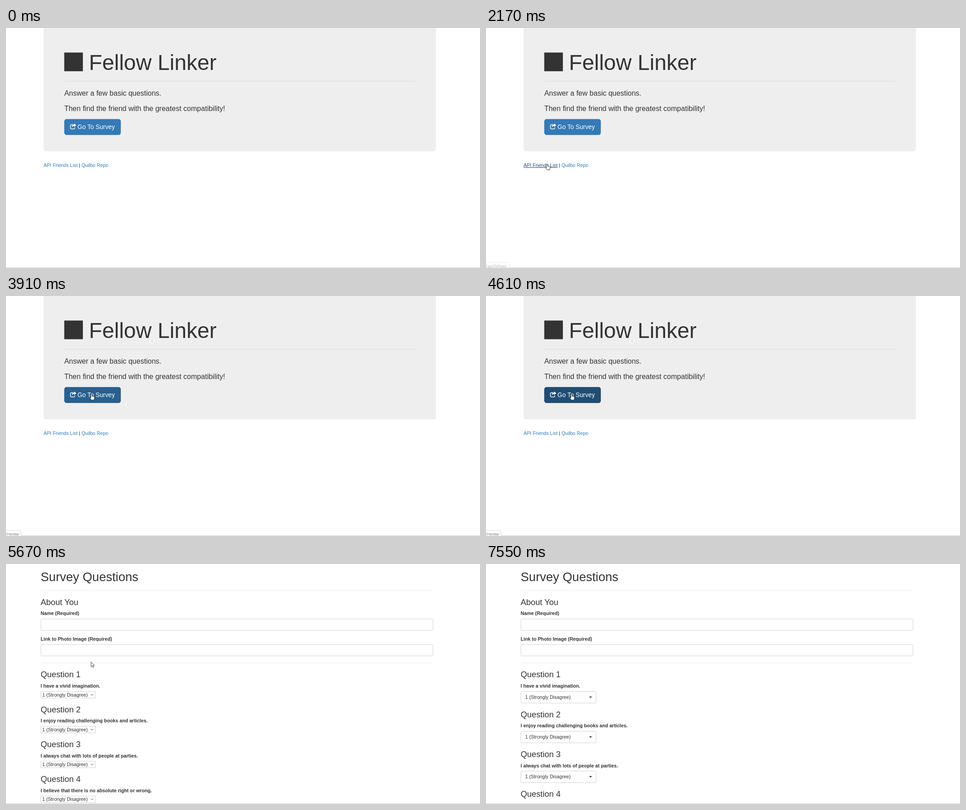
Recreate the animation shown at these times as an HTML page. Size 1053 by 532 pixels, loop 7.96 s.

```html
<!DOCTYPE html>
<html lang="en">
<head>
<meta charset="utf-8">
<title>Survey walkthrough</title>
<style>
html, body { margin: 0; width: 100%; height: 100%; overflow: hidden; background: #fff; }
svg { display: block; width: 1053px; height: 532px; font: 10.7px "Liberation Sans", Arial, sans-serif; fill: #333; }
.lead { font-size: 16.05px; }
.link { fill: #337ab7; }
.link.on { fill: #23527c; text-decoration: underline; }
.btn { fill: #337ab7; stroke: #2e6da4; stroke-width: .8; }
.btn.on { fill: #286090; stroke: #204d74; }
.btn.down { fill: #204d74; stroke: #122b40; }
.h1 { font-size: 27.5px; }
.h3 { font-size: 18.35px; }
.b { font-weight: bold; }
.rule { fill: #eee; }
.field { fill: #fff; stroke: #ccc; stroke-width: .9; }
.status { font: 8.5px "Open Sans", "Noto Sans", sans-serif; fill: #777; }
.status path { fill: #fff; stroke: #d8d8d8; }
.cursor { fill: #fff; stroke: #222; stroke-width: .85; stroke-linejoin: round; }
</style>
</head>
<body>
<svg viewBox="0 0 1053 532">
  <g id="home">
    <rect x="83.7" y="-10" width="871.5" height="283.2" rx="4.6" fill="#eee"/>
    <rect x="129.4" y="54.4" width="41.4" height="41.4"/>
    <text x="184.3" y="92.6" font-size="48.15">Fellow Linker</text>
    <rect x="129.6" y="117.5" width="780" height="1" fill="#d5d5d5"/>
    <text class="lead" x="129.4" y="150">Answer a few basic questions.</text>
    <text class="lead" x="129.4" y="184.4">Then find the friend with the greatest compatibility!</text>
    <rect id="btn" x="129.9" y="202.3" width="124.7" height="34.4" rx="4.4"/>
    <path d="M149 214.2h-3.6q-2.2 0-2.2 2.2v5.2q0 2.2 2.2 2.2h5.2q2.2 0 2.2-2.2v-1.4" fill="none" stroke="#fff" stroke-width="1.4"/>
    <path d="M151.3 211.6l4.7 4-4.7 4v-2.3q-3.3-.2-5 3.1 0-6 5-6.4z" fill="#fff"/>
    <text x="158.8" y="224" font-size="13.76" fill="#fff">Go To Survey</text>
    <text x="83.5" y="307.8"><tspan id="link">API Friends List</tspan> | <tspan class="link">Quilbo Repo</tspan></text>
  </g>
  <g id="form">
    <text class="h1" x="77" y="37.5">Survey Questions</text>
    <rect class="rule" x="77" y="58" width="872" height="1"/>
    <text class="h3" x="77" y="90.6">About You</text>
    <text class="b" x="77" y="113.2">Name (Required)</text>
    <rect class="field" x="77.4" y="121.9" width="871" height="25.4" rx="3"/>
    <text class="b" x="77" y="169.7">Link to Photo Image (Required)</text>
    <rect class="field" x="77.4" y="178.4" width="871" height="25.4" rx="3"/>
    <rect class="rule" x="77" y="219" width="872" height="1"/>
    <g id="plain"></g>
    <g id="styled"></g>
  </g>
  <rect y="531" width="1053" height="1" fill="#ccc"/>
  <g id="status" class="status">
    <path id="tab"/>
    <text id="url" x="0" y="531"></text>
  </g>
  <g id="cursor" class="cursor">
    <path id="arrow" d="M0 0v10.6l2.5-2.2 1.7 3.8 1.7-.7-1.7-3.8h3.2z"/>
    <path id="hand" d="M-1.2 1Q0 -.8 1.2 1V5l4 .9q1.4.4 1.3 1.9L5.6 13.6H-.2L-3.6 9Q-3.7 7.3-1.2 8.6z"/>
  </g>
</svg>
<script>
const $ = id => document.getElementById(id);
const LOOP = 7960, SWAP = 5360, STYLED = 6180;

const questions = [
  "I have a vivid imagination.",
  "I enjoy reading challenging books and articles.",
  "I always chat with lots of people at parties.",
  "I believe that there is no absolute right or wrong."
];

function rows(step, select) {
  return questions.map((q, i) => `<g transform="translate(77 ${251.4 + i * step})">
    <text class="h3">Question ${i + 1}</text>
    <text class="b" y="22.8">${q}</text>${select}</g>`).join("");
}
const answer = "1 (Strongly Disagree)";
$("styled").innerHTML = rows(88.2, `
  <rect class="field" x=".4" y="31.2" width="167.4" height="25.6" rx="3"/>
  <text x="10" y="47.6">${answer}</text>
  <path d="M152 42.3h6.6l-3.3 3.3z"/>`);
$("plain").innerHTML = rows(77.2, `
  <rect class="field" x=".4" y="31.2" width="121" height="14.6"/>
  <text x="3.5" y="42.3">${answer}</text>
  <path d="M111.5 37l2.8 2.8 2.8-2.8" style="fill:none;stroke:#333"/>`);

// start, end, positions, from x y, to x y, easing power
const moves = [
  [300, 1040, 10, 669, 472, 258, 318, 1.6],
  [1400, 2010, 9, 253, 318, 136, 301, 1.4],
  [2630, 2940, 5, 141, 297, 180, 257, 1],
  [2940, 3420, 7, 180, 257, 184, 238, 1.3],
  [3480, 3480, 1, 185, 232, 185, 232, 1],
  [3700, 3910, 4, 186, 228, 190, 217, 1],
  [5200, 5200, 1, 189, 217, 189, 217, 1],
  [6180, 6265, 2, 360, 345, 648, 518, 1],
  [7240, 7470, 4, 1017, 528, 1044, 528, 1]
];

function pointer(t) {
  const m = moves.findLast(m => t >= m[0]);
  if (!m || (t >= 6350 && t < 7240) || t >= 7550) return null;
  const [a, b, n, x0, y0, x1, y1, pow] = m;
  const k = n < 2 ? 1 : Math.min(1, Math.floor((t - a) / (b - a) * (n - 1) + 1e-6) / (n - 1));
  const e = 1 - (1 - k) ** pow;
  return [x0 + (x1 - x0) * e, y0 + (y1 - y0) * e];
}

const show = (id, on) => $(id).style.display = on ? "" : "none";
const clamp = v => Math.max(0, Math.min(1, v));
const fade = (t, a, b, c, d) => clamp((t - a) / (b - a)) * clamp((d - t) / (d - c));

function draw(t) {
  const home = t < SWAP, p = pointer(t);
  show("home", home);
  show("form", !home);
  show("plain", t < STYLED);
  show("styled", t >= STYLED);

  const onBtn = home && t >= 3480;
  const onLink = home && !!p && p[0] > 83 && p[0] < 159 && p[1] > 297 && p[1] < 311;
  const pressed = t >= 4480 && t < 4740;
  $("btn").setAttribute("class", "btn" + (pressed ? " down" : onBtn ? " on" : ""));
  $("link").setAttribute("class", "link" + (onLink ? " on" : ""));

  const late = t > 3500, w = late ? 33.5 : 51.5;
  $("url").textContent = late ? "/review" : "/api/fellows";
  $("tab").setAttribute("d", `M-2 519.5H${w - 3}q3 0 3 3V534H-2z`);
  $("status").style.opacity = late ? fade(t, 3640, 3780, 5150, SWAP) : fade(t, 2110, 2230, 3020, 3250);

  show("cursor", p);
  if (p) $("cursor").setAttribute("transform", `translate(${p})`);
  const hand = onLink || (onBtn && t < 5200);
  show("hand", hand);
  show("arrow", !hand);
}

function frame() {
  draw(performance.now() % LOOP);
  requestAnimationFrame(frame);
}
frame();
</script>
</body>
</html>
```
